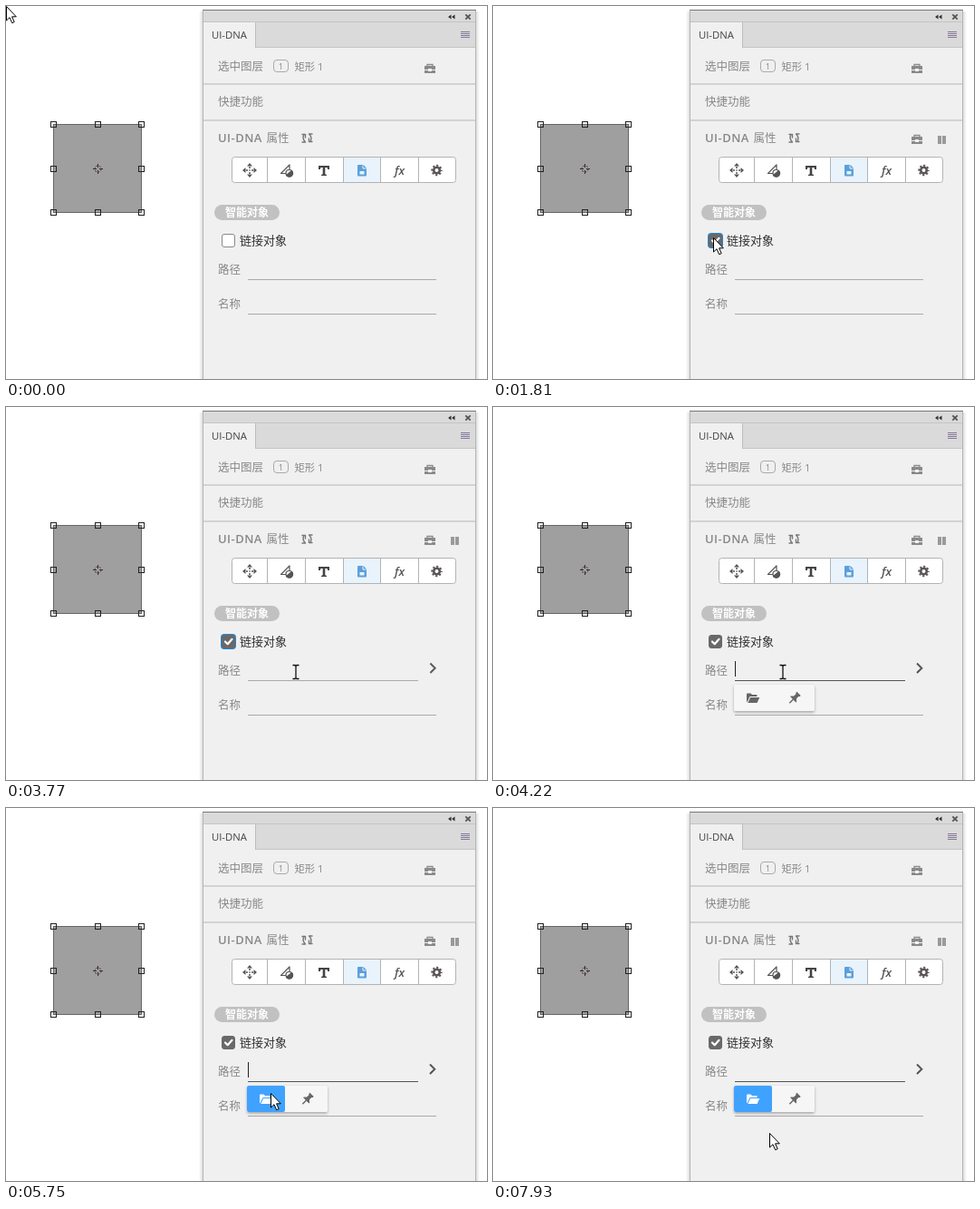
An HTML page that plays this animation: 531x411 px, repeating every 8 s.

```html
<!DOCTYPE html>
<html lang="zh-CN">
<head>
<meta charset="utf-8">
<title>Panel demo</title>
<style>
  html, body { margin: 0; width: 100%; height: 100%; overflow: hidden; background: #fff; }
  svg { display: block; width: 100%; height: 100%; }
  text { font-family: "Open Sans", "Noto Sans CJK SC", "Noto Sans CJK", sans-serif; fill: #888; font-size: 12.5px; }
  .cjk { font-family: "Noto Sans CJK SC", "Noto Sans CJK", sans-serif; }
  .semi { font-weight: 500; }
  .crisp { shape-rendering: crispEdges; }
  .line { fill: none; stroke-linecap: round; stroke-linejoin: round; }
</style>
</head>
<body>
<svg viewBox="0 0 531 411">
  <defs>
    <filter id="shadow" x="-20%" y="-30%" width="140%" height="180%">
      <feDropShadow dx="0" dy="1.5" stdDeviation="1.8" flood-color="#000" flood-opacity=".32"/>
    </filter>
    <linearGradient id="edge">
      <stop offset="0" stop-color="#000" stop-opacity="0"/>
      <stop offset="1" stop-color="#000" stop-opacity=".13"/>
    </linearGradient>
    <g id="toolbox" fill="#8a8a8a">
      <path d="M-3 -2.500V-4.500H3V-2.500" fill="none" stroke="#8a8a8a" stroke-width="1.3"/>
      <path d="M-6 -3H6V1H2V0H-2V1H-6ZM-6 2H-2V3H2V2H6V5H-6Z"/>
    </g>
    <path id="folder" d="M-7 4.500V-4.500Q-7 -5.500 -6 -5.500H-2.500L-1 -4H3.500Q4.500 -4 4.500 -3V-2H-3.500L-6 3.200ZM-5.700 5L-2.800 -1H7.300L4.600 5Z"/>
  </defs>

  <g id="shape">
    <rect class="crisp" x="52.5" y="130.500" width="97" height="97" fill="#9f9f9f" stroke="#666"/>
    <g id="handles" class="crisp" fill="none" stroke="#222"></g>
    <g fill="none" stroke="#3a2a2a">
      <circle cx="101.5" cy="179.500" r="3.500" stroke-dasharray="2 1.500"/>
      <path class="crisp" d="M96 179.500h4M103 179.500h4M101.500 174v4M101.500 181v4"/>
    </g>
  </g>

  <g id="panel">
    <rect x="213" y="6" width="4" height="405" fill="url(#edge)"/>
    <rect x="-523" y="6" width="4" height="405" fill="url(#edge)" transform="scale(-1 1)"/>
    <g class="crisp">
      <rect x="217" y="4" width="302" height="407" fill="#f0f0f0"/>
      <rect x="217" y="4" width="302" height="42" fill="#dadada"/>
      <path d="M217 17.500H519M276 45.500H519" stroke="#c4c4c4"/>
      <rect x="218" y="18" width="57" height="28" fill="#f0f0f0"/>
      <path d="M275.500 18V46" stroke="#bdbdbd"/>
      <path d="M217.500 411V5M518.500 5V411" stroke="#b4b4b4"/>
      <path d="M217 4.500H519" stroke="#777"/>
      <path d="M218 86H518M218 126H518" stroke="#d3d3d3" stroke-width="2"/>
    </g>
    <path d="M491.500 9.500L488 12L491.500 14.500ZM495.500 9.500L492 12L495.500 14.500Z" fill="#333"/>
    <path d="M507.300 9.300L512.700 14.700M512.700 9.300L507.300 14.700" stroke="#555" stroke-width="1.800"/>
    <path class="crisp" d="M502 28.500H512M502 30.500H512M502 32.500H512M502 34.500H512" stroke="#85789a"/>

    <text x="227" y="36" style="font-size:11.300px;fill:#444">UI-DNA</text>
    <text class="cjk semi" x="234" y="70.500">选中图层</text>
    <rect x="295.500" y="59.500" width="16" height="13" rx="3.500" fill="none" stroke="#aaa"/>
    <text x="303.500" y="69.800" text-anchor="middle" style="font-size:9.500px">1</text>
    <text x="318.500" y="70.500" style="font-size:11.300px">矩形 1</text>
    <use href="#toolbox" x="468" y="69"/>
    <text class="cjk" x="234" y="110">快捷功能</text>
    <text x="234" y="150" style="font-size:13px;font-weight:600;letter-spacing:.45px">UI-DNA</text>
    <text class="cjk semi" x="287.500" y="150">属性</text>
    <g class="line" stroke="#777" stroke-width="1.400">
      <path d="M329 141.500Q326.500 146 330.500 150H327M327 141.500H330.500V145"/>
      <path d="M336 149.500Q338.500 145 334.500 141H338M338 149.500H334.500V146"/>
    </g>
  </g>

  <g id="toolbar">
    <rect x="249.500" y="166.500" width="247" height="28" rx="3" fill="#fff" stroke="#b3b3b3"/>
    <rect class="crisp" x="373" y="167" width="40" height="27" fill="#e9f3fc"/>
    <path class="crisp" d="M288.500 167V194M330.500 167V194M372.500 167V194M413.500 167V194M455.500 167V194" stroke="#b3b3b3"/>
    <g fill="#555" transform="translate(269 181)">
      <path d="M0 -8L3 -4.500H-3ZM0 8L3 4.500H-3ZM-8 0L-4.500 -3V3ZM8 0L4.500 -3V3Z"/>
      <path d="M0 -4V-2M0 2V4M-4 0H-2M2 0H4M-.7 0H.7" stroke="#555" stroke-width="1.500"/>
    </g>
    <g class="line" stroke="#555" stroke-width="1.200">
      <path d="M303.500 184.500L313 175V184.500Z"/>
      <circle cx="312.500" cy="184" r="3.500" fill="#fff"/>
      <path d="M309.500 186.500L315.500 181.500A3.800 3.800 0 0 1 310 187Z" fill="#555"/>
    </g>
    <path d="M345 176H357V180H355.200L354.500 178H352.300V185.300L354 186V187H348V186L349.700 185.300V178H347.500L346.800 180H345Z" fill="#444"/>
    <path d="M388 176Q388 175 389 175H394.500L398 178.500V186.500Q398 187.500 397 187.500H389Q388 187.500 388 186.500Z" fill="#5c9fdb"/>
    <path d="M394 175.500V179H397.500" fill="none" stroke="#e9f3fc"/>
    <path d="M390.500 182H395.500V185.500H390.500Z" fill="#e9f3fc"/>
    <text x="434.500" y="185.500" text-anchor="middle" style="font-size:13px;font-style:italic;font-weight:600;fill:#555">fx</text>
    <g fill="none" stroke="#5a5558" transform="translate(475.500 181)">
      <circle r="3.300" stroke-width="2.600"/>
      <circle r="5.200" stroke-width="2" stroke-dasharray="2.100 1.984" stroke-dashoffset="1"/>
    </g>
  </g>

  <g id="form">
    <rect x="230" y="219" width="72" height="17" rx="8.500" fill="#c1c1c1"/>
    <text class="cjk" x="266" y="232" text-anchor="middle" style="font-size:12px;font-weight:700;fill:#fff">智能对象</text>
    <rect id="ring" x="237" y="250" width="17" height="17" rx="4" fill="#2486cf"/>
    <rect id="box" x="238.500" y="251.500" width="14" height="14" rx="2.500"/>
    <path id="tick" class="line" d="M242 258.500L244.700 261.200L249.500 255.800" stroke="#fff" stroke-width="2.200"/>
    <text class="cjk" x="258" y="263" style="font-size:13px;fill:#333">链接对象</text>
    <text class="cjk" x="234" y="295">路径</text>
    <text class="cjk" x="234" y="333">名称</text>
    <path id="pathLine" class="crisp"/>
    <path class="crisp" d="M267 339.500H475" stroke="#aaa"/>
    <path id="caret" class="crisp" d="M267.500 280V297" stroke="#222"/>
    <path id="chevron" d="M468 282.500L473.300 287.800L468 293" fill="none" stroke="#555" stroke-width="2"/>
  </g>

  <g id="hoverTools">
    <use href="#toolbox" x="468" y="147"/>
    <path class="crisp" d="M491 143H495V152H491ZM496 143H500V152H496Z" fill="#9a9a9a"/>
  </g>

  <g id="popup">
    <rect x="266" y="306" width="89" height="29" rx="2" fill="#f6f6f6" filter="url(#shadow)"/>
    <rect id="openButton" x="266" y="306" width="42" height="29" rx="2" fill="#40a2ff"/>
    <use id="openIcon" href="#folder" x="287" y="321"/>
    <g transform="translate(333 320.500) rotate(45)" fill="#666">
      <path d="M-3 -6.500H3V-5L2 -4V-.7L4.500 1.500V2.500H-4.500V1.500L-2 -.7V-4L-3 -5Z"/>
      <path d="M0 2V8" stroke="#666" stroke-width="1.400"/>
    </g>
  </g>

  <path id="arrow" d="M.5 .5V16L4 12.700L6.700 18.700L9.200 17.600L6.600 11.800H11.300Z" fill="#fff" stroke="#000"/>
  <g id="beam" fill="none">
    <path d="M-3.500 -7.500H-1L0 -6.500L1 -7.500H3.500M0 -6.500V6.500M-3.500 7.500H-1L0 6.500L1 7.500H3.500" stroke="#111" stroke-width="1.300"/>
  </g>
</svg>

<script>
  const LOOP = 8000;
  const $ = id => document.getElementById(id);
  const clamp = v => Math.max(0, Math.min(1, v));
  const show = (id, opacity) => $(id).setAttribute('opacity', +opacity);
  const set = (id, attrs) => { for (const k in attrs) $(id).setAttribute(k, attrs[k]); };
  const within = (t, from, to) => t >= from && t < to;

  for (const y of [130, 179, 227])
    for (const x of [52, 101, 149])
      if (x !== 101 || y !== 179)
        $('handles').innerHTML += `<rect x="${x - 2.5}" y="${y - 2.5}" width="6" height="6"/>`;

  // Pointer stops: time, x, y
  const stops = [
    [500, 292, 364], [610, 264, 305], [710, 247, 266], [820, 240, 254],
    [1270, 241, 255], [1370, 243, 255],
    [3230, 265, 269], [3340, 288, 301], [3450, 304, 297], [3560, 314, 293], [3670, 320, 292],
    [5420, 316, 300], [5530, 296, 309], [5640, 293, 314], [5750, 292, 314],
    [7150, 292, 315],
    [7480, 294, 320], [7590, 298, 332], [7700, 302, 345], [7810, 304, 354], [7930, 305, 358]
  ];

  function render(t) {
    const stop = stops.filter(s => s[0] <= t).pop();
    const overField = within(t, 3450, 5420);
    show('arrow', stop && !overField);
    show('beam', overField);
    if (stop) set(overField ? 'beam' : 'arrow', { transform: `translate(${stop[1]} ${stop[2]})` });

    show('hoverTools', t >= 500);

    const checked = t >= 1810;
    show('ring', within(t, 1700, 4110));
    set('box', { fill: checked ? '#696969' : '#fff', stroke: checked ? '#696969' : '#8a8a8a' });
    show('tick', checked);

    // The chevron slides in while the field is hovered
    const slide = clamp((Math.floor(t / 110) * 110 - 3300) / 550);
    const eased = 1 - (1 - slide) ** 2;
    show('chevron', eased);
    set('chevron', { transform: `translate(${10 * (1 - eased)} 0)` });
    set('pathLine', {
      d: `M267 301.500H${t < 3450 ? 475 : 455}`,
      stroke: t < 4110 ? '#aaa' : '#555'
    });

    show('caret', within(t, 4110, 4990) || within(t, 5420, 5960));
    show('popup', t < 4110 ? 0 : t < 4220 ? 0.5 : 1);

    show('openButton', t < 5640 ? 0 : t < 5750 ? 0.6 : 1);
    set('openButton', { fill: within(t, 5960, 6060) ? '#3595f0' : '#40a2ff' });
    set('openIcon', { fill: t < 5640 ? '#666' : '#fff' });
  }

  function frame() {
    render(performance.now() % LOOP);
    requestAnimationFrame(frame);
  }
  frame();
</script>
</body>
</html>
```
